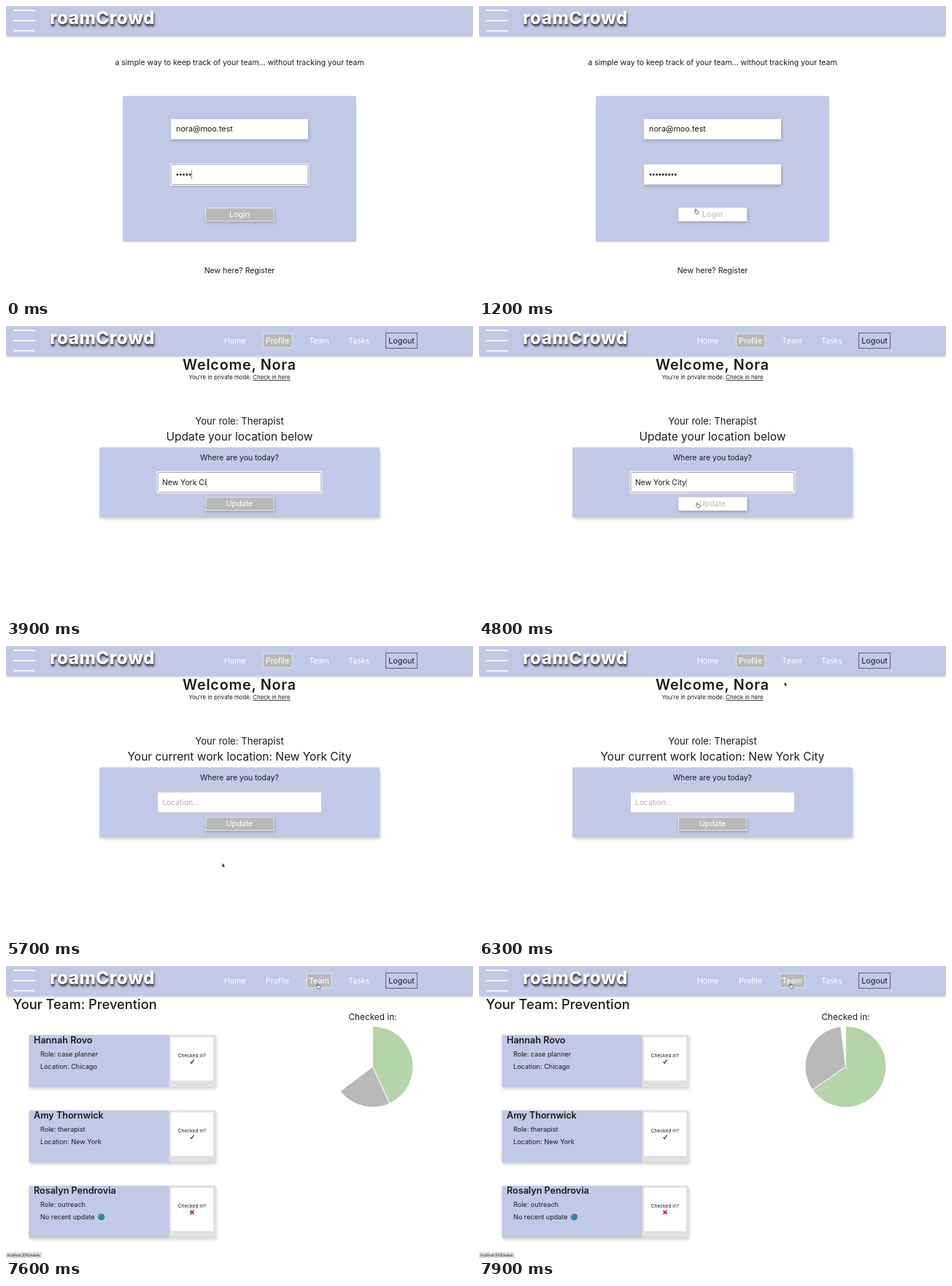
These frames come from a looping animation (640x400 px, 8 s). An HTML page:

```html
<!DOCTYPE html>
<html lang="en">
<head>
<meta charset="utf-8">
<title>Team check-in demo</title>
<style>
  html, body { margin: 0; width: 100%; height: 100%; overflow: hidden; background: #fff; }
  svg { display: block; width: 100%; height: 100%; }
  text { font-family: Inter, "Open Sans", sans-serif; white-space: pre; }
  .logo { font-weight: 800; letter-spacing: .5px; text-shadow: 1px 3px 3px #000a, 0 1px 1px #0009; }
  .soft { filter: drop-shadow(1px 2px 2px #0003); }
  .bar { filter: drop-shadow(0 1px 2px #0005); }
</style>
</head>
<body>
<svg id="stage" viewBox="0 0 640 400"></svg>
<script>
const LOOP = 8000;
const LAVENDER = '#c2c9e6', GRAY = '#b9b9b9', INK = '#1b1b1f';
const PIE = { x: 502.5, y: 138, r: 55.5 };

// ---- Markup helpers ----
const text = (x, y, size, str, attrs = '') =>
  `<text x="${x}" y="${y}" font-size="${size}" fill="${INK}" ${attrs}>${str}</text>`;
const centered = (x, y, size, str, attrs = '') => text(x, y, size, str, `text-anchor="middle" ${attrs}`);
const box = (x, y, w, h, fill, attrs = '') =>
  `<rect x="${x}" y="${y}" width="${w}" height="${h}" fill="${fill}" ${attrs}/>`;
const group = (id, ...parts) => `<g id="${id}">${parts.join('')}</g>`;

const input = (id, x, y, w, h, attrs = '') =>
  box(x, y, w, h, '#fff', attrs) +
  group(id,
    box(x - 1.5, y - 1.5, w + 3, h + 3, '#fff', 'rx="2"'),
    box(x, y, w, h, '#fff', 'rx="1.5" stroke="#8a8a90" stroke-width=".8"'));

const button = (id, y, label) =>
  box(273.5, y, 93.5, 17.8, GRAY, `id="${id}Box" class="soft" stroke="#f1f1f0" stroke-width=".8"`) +
  centered(320, y + 12.3, 10.7, label, `id="${id}Label"`);

const navLink = (x, label) => centered(x, 23.5, 10.6, label, 'style="fill:#fff"');
const navMark = (id, x, w) =>
  group(id, box(x, 10.5, w, 19, GRAY, 'stroke="#eeeeec" stroke-width=".7"'));

const TICK = '<path d="M-2.4 .3L-.8 2.3L2.6 -2.6" fill="none" stroke="#222" stroke-width="1.1"/>';
const CROSS = '<path d="M-2.5 -2.5L2.5 2.5M2.5 -2.5L-2.5 2.5" stroke="#e0182d" stroke-width="1.9"/>';
const GLOBE = `<g transform="translate(130.5 137.4)"><circle r="4.6" fill="#2374c4"/>
  <path d="M-3.8 -2Q-1 -5 1 -3.5L0 -1L-2 0L0 2L-1 4Q-3 2 -3.8 -2ZM2 -2L4 -1L3 2L1.5 1Z" fill="#57a64a"/></g>`;

const card = (row, name, role, place, present) => `
  <g transform="translate(0 ${row * 103.2})">
    <g class="soft">${box(31.5, 94.5, 255.5, 71.5, '#e0e0e1', 'rx="1"')}</g>
    ${box(31.5, 94.5, 192, 71.5, LAVENDER, 'rx="1"')}${box(226, 97.3, 58, 59.5, '#fff')}
    ${text(38, 106, 12.6, name, 'font-weight="600"')}
    ${text(47, 123.8, 9.1, 'Role: ' + role)}${text(47, 140.8, 9.1, place)}
    ${centered(255, 124.5, 6.6, 'Checked in?')}
    <g transform="translate(255 131)">${present ? TICK : CROSS}</g>
    ${present ? '' : GLOBE}
  </g>`;

const menuItems = [[46, 'File'], [60.5, 'Edit'], [77, 'View'], [94, 'History'], [117, 'Bookmarks'],
  [148, 'Profiles'], [172, 'Tab'], [187, 'Window'], [212, 'Help']];
const menuIcons = [451, 464.5, 478, 490, 502, 515, 527.5, 542, 554, 565, 577];
const white = 'style="fill:#fff"';

// ---- Scene ----
stage.innerHTML = [
  box(0, 0, 640, 400, '#fff'),

  group('login',
    centered(320, 81, 10.46, 'a simple way to keep track of your team... without tracking your team'),
    box(160, 123.2, 320, 200, LAVENDER, 'rx="2"'),
    input('emailFocus', 226, 155, 188, 27.5, 'class="soft"'), text(233, 172.2, 10.8, 'nora@moo.test'),
    input('passFocus', 226, 217, 188, 27.5, 'class="soft"'),
    `<line id="dots" x1="235" y1="231" y2="231" stroke="${INK}" stroke-width="2.8" stroke-linecap="round" stroke-dasharray="0 4.28"/>`,
    button('enter', 276.8, 'Login'),
    centered(320, 366.3, 10.5, 'New here? Register')),

  group('profile',
    centered(320, 59.8, 19.7, 'Welcome, Nora', 'font-weight="600" letter-spacing=".8"'),
    centered(320, 73, 7.85, 'You\'re in private mode. <tspan text-decoration="underline">Check in here</tspan>'),
    centered(320, 135.2, 13.1, 'Your role: Therapist'),
    centered(320, 157.2, 15.5, '', 'id="place"'),
    box(128, 166.2, 384, 96, LAVENDER, 'rx="2" class="soft"'),
    centered(320, 183.5, 10.45, 'Where are you today?'),
    input('placeFocus', 208, 200.6, 224, 27.2),
    text(214, 217.8, 10.4, 'Location...', 'id="hint" style="fill:#b4b4b6"'),
    text(214, 217.8, 10.4, '', 'id="typed"'),
    button('save', 234.8, 'Update')),

  group('team',
    text(9.5, 58.8, 18.3, 'Your Team: Prevention', 'font-weight="500"'),
    card(0, 'Hannah Rovo', 'case planner', 'Location: Chicago', true),
    card(1, 'Amy Thornwick', 'therapist', 'Location: New York', true),
    card(2, 'Rosalyn Pendrovia', 'outreach', 'No recent update', false),
    centered(502.5, 74, 11.8, 'Checked in:'),
    '<path id="present" fill="#b5d4a8" stroke="#fff"/>',
    `<path id="absent" fill="${GRAY}" stroke="#fff"/>`),

  '<line id="caret" stroke="#555" stroke-width=".7"/>',

  box(0, 0, 640, 40.3, LAVENDER, 'class="bar"'),
  '<path d="M10 6H40M10 20H40M10 34H40" stroke="#fff" stroke-width="1.7"/>',
  text(60, 24.8, 24.2, 'roamCrowd', `class="logo" ${white}`),
  group('nav',
    navMark('profileMark', 352.5, 39.5), navMark('teamMark', 412.5, 33.5),
    navLink(313.5, 'Home'), navLink(372, 'Profile'), navLink(429, 'Team'), navLink(483.5, 'Tasks'),
    box(520.5, 9.5, 43, 21, 'none', 'stroke="#565a6a" stroke-width=".9"'),
    centered(542, 23.5, 10.8, 'Logout')),

  group('menu',
    box(0, 10, 640, 8, '#fbfbfd'),
    box(0, -10, 640, 20, '#110b8f'),
    [10, 17, 24].map(x => `<circle cx="${x}" cy="14" r="2" fill="#a5a5aa"/>`).join(''),
    '<circle cx="10.5" cy="5.4" r="2" fill="#fff"/>',
    text(20.5, 7.2, 4.9, 'Viewer', `font-weight="700" ${white}`),
    menuItems.map(([x, label]) => text(x, 7.2, 4.6, label, white)).join(''),
    menuIcons.map((x, i) => i % 3 ? `<circle cx="${x}" cy="5.4" r="1.8" fill="#fff"/>`
      : box(x - 2.5, 4, 5, 3, '#fff', 'rx=".8"')).join(''),
    text(585.5, 7.2, 4.6, 'Tue Feb 22', white),
    text(633, 7.2, 4.6, '10:06 AM', `text-anchor="end" ${white}`)),

  group('status', box(-2, 392, 51, 10, '#dcdde0', 'rx="1.5"'),
    text(2, 397.6, 4.3, 'localhost:3000/teams')),

  group('pointer',
    '<path id="arrow" d="M0 0V5.8L1.3 4.6L2.2 6.8L3.2 6.3L2.3 4.3H4Z" fill="#111" stroke="#fff" stroke-width=".4"/>',
    '<path id="hand" d="M-1.6 -.6q.6 -.9 1.2 0v2l2.4 .5q1 .4 .8 1.8l-.6 2.1h-2.9l-1.9 -2.4q0 -1 1 -.4z" fill="#fff" stroke="#222" stroke-width=".6"/>',
    '<path id="beam" d="M-1.3 -3.2Q0 -3.2 0 -2V3Q0 4 -1.3 4M1.3 -3.2Q0 -3.2 0 -2M0 3Q0 4 1.3 4" fill="none" stroke="#333" stroke-width=".7"/>')
].join('');

// ---- Timing ----
const pointerPath = [[600, 330, 330], [900, 298, 279], [1350, 298, 279], [1900, 240, 214],
  [4350, 240, 214], [4650, 300, 243], [4950, 300, 243], [5200, 281.5, 282.5], [5620, 281.5, 282.5],
  [5700, 296.3, 297.3], [5850, 296.3, 297.3], [6000, 300, 304], [6400, 440, 3], [6800, 440, 3],
  [7100, 437.7, 82.5], [7300, 428, 25]];
const menuSlide = [[6400, -19], [6550, 0], [7050, 0], [7100, -4], [7250, -19]];
const typing = [[3200, 'N'], [3300, 'Ne'], [3400, 'New '], [3500, 'New Yo'], [3600, 'New Yor'],
  [3700, 'New York '], [3900, 'New York Ci'], [4200, 'New York City'], [4900, '']];
const cursorShapes = [[0, 'arrow'], [880, 'hand'], [1300, 'arrow'], [1800, 'beam'],
  [4500, 'arrow'], [4600, 'hand'], [5000, 'arrow'], [7250, 'hand']];

const $ = id => document.getElementById(id);
const show = (id, on) => $(id).setAttribute('display', on ? 'inline' : 'none');
const set = (id, attrs) => { for (const key in attrs) $(id).setAttribute(key, attrs[key]); };
const within = (t, from, to) => t >= from && t < to;
const latest = (steps, t, first) => steps.reduce((value, [at, next]) => t >= at ? next : value, first);

function along(keys, t) {
  const i = keys.findIndex(key => key[0] > t);
  if (i === 0) return keys[0].slice(1);
  if (i < 0) return keys[keys.length - 1].slice(1);
  const [from, to] = [keys[i - 1], keys[i]];
  const u = (t - from[0]) / (to[0] - from[0]), eased = u * u * (3 - 2 * u);
  return from.slice(1).map((v, k) => v + (to[k + 1] - v) * eased);
}

function slice(from, to) {
  const rim = a => `${PIE.x + PIE.r * Math.sin(a)} ${PIE.y - PIE.r * Math.cos(a)}`;
  return `M${PIE.x} ${PIE.y}L${rim(from)}A${PIE.r} ${PIE.r} 0 ${+(to - from > Math.PI)} 1 ${rim(to)}Z`;
}

function setButton(id, hovered) {
  set(id + 'Box', { fill: hovered ? '#fff' : GRAY });
  $(id + 'Label').style.fill = hovered ? GRAY : '#fff';
}

function placeCaret(x, y, on) {
  show('caret', on);
  set('caret', { x1: x, x2: x, y1: y - 6, y2: y + 6 });
}

function render(t) {
  const onLogin = t < 1300, onTeam = t >= 7400, onProfile = !onLogin && !onTeam;
  show('login', onLogin);
  show('profile', onProfile);
  show('team', onTeam);
  show('nav', !onLogin);
  show('emailFocus', false);

  const passFocused = t < 1000;
  const count = t >= 500 ? 9 : 5 + Math.min(3, Math.floor(t / 100));
  show('passFocus', passFocused);
  set('dots', { x2: 235.1 + 4.28 * (count - 1) });
  setButton('enter', within(t, 880, 1300));

  const placeFocused = within(t, 1950, 4850);
  const entry = latest(typing, t, '');
  show('placeFocus', placeFocused);
  show('hint', !entry);
  $('typed').textContent = entry;
  $('place').textContent = t < 4900 ? 'Update your location below' : 'Your current work location: New York City';
  setButton('save', within(t, 4600, 5000));

  if (onLogin) placeCaret(233.1 + 4.28 * count, 231, passFocused);
  else {
    const blinkedOff = within(t, 2300, 2500) || within(t, 2800, 3000);
    const width = entry && onProfile ? $('typed').getComputedTextLength() : 0;
    placeCaret(214.4 + width, 214.5, placeFocused && !blinkedOff);
  }

  show('profileMark', onProfile);
  show('teamMark', t >= 7250);
  show('status', t >= 7250);

  const left = 1 - Math.min(1, Math.max(0, (t - 7400) / 685));
  const sweep = 2 * Math.PI * Math.min(.9999, 1 - left ** 3);
  set('present', { d: slice(0, sweep * 2 / 3) });
  set('absent', { d: slice(sweep * 2 / 3, sweep) });

  show('menu', within(t, 6400, 7250));
  set('menu', { transform: `translate(0 ${along(menuSlide, t)[0]})` });

  const shape = latest(cursorShapes, t);
  show('pointer', within(t, 600, 3200) || t >= 4400);
  set('pointer', { transform: `translate(${along(pointerPath, t).join(' ')})` });
  for (const id of ['arrow', 'hand', 'beam']) show(id, id === shape);
}

function frame() {
  render(performance.now() % LOOP);
  requestAnimationFrame(frame);
}
frame();
</script>
</body>
</html>
```
